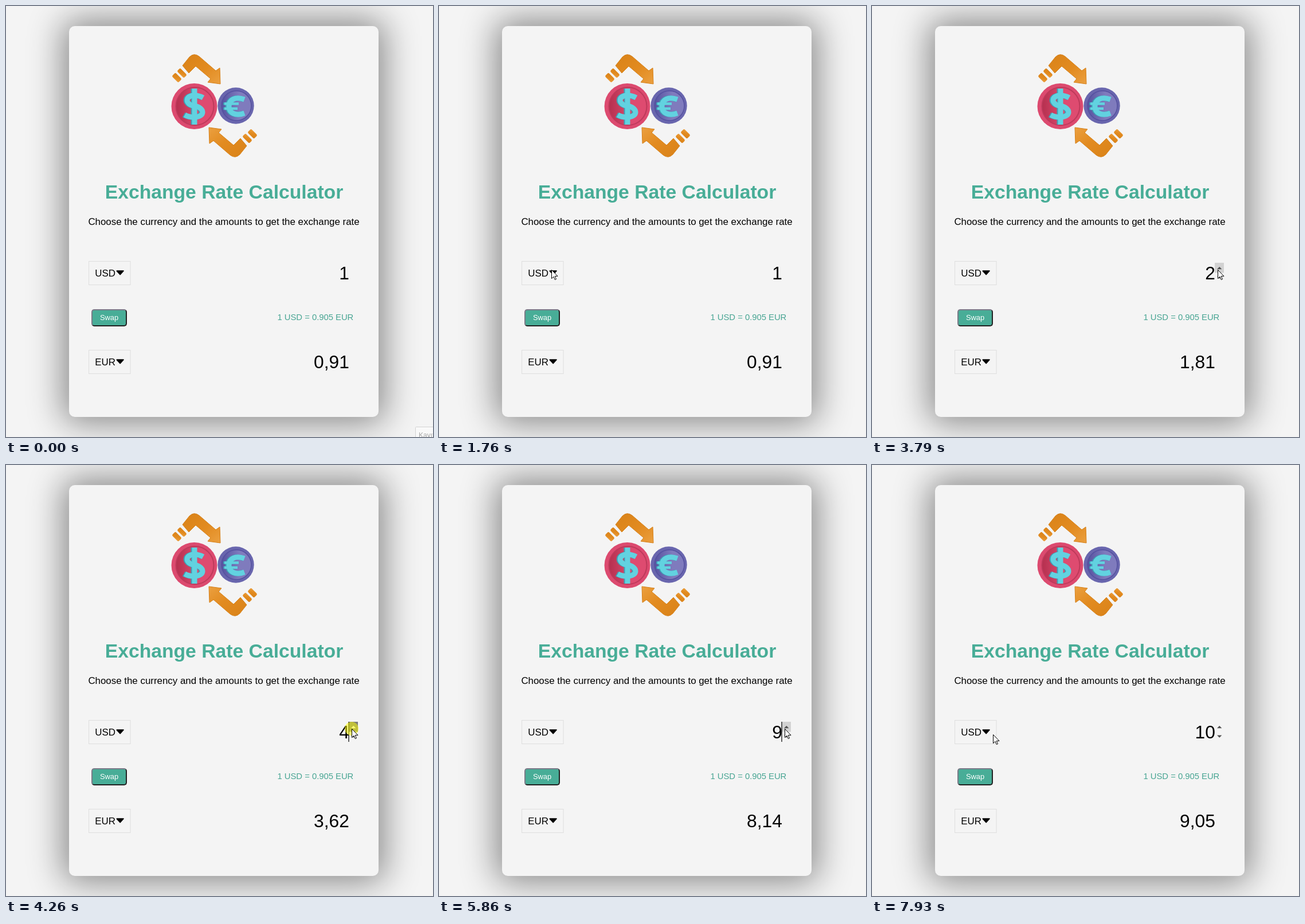
Write an HTML page that moves like this. It is 745 by 752 pixels and loops after 8000 ms.

```html
<!DOCTYPE html>
<html lang="en">
<head>
<meta charset="utf-8">
<title>Exchange Rate Calculator</title>
<style>
  html, body { margin: 0; width: 100%; height: 100%; overflow: hidden; background: #f4f4f4; }
  #stage { position: relative; width: 745px; height: 752px; overflow: hidden; }
  #card {
    position: absolute; left: 110px; top: 35px; width: 540px; height: 682px;
    border-radius: 10px; background: #f4f4f4; box-shadow: 0 0 60px 10px rgba(0, 0, 0, .45);
  }
  #swap {
    position: absolute; left: 149px; top: 528.5px; width: 62px; height: 30px; box-sizing: border-box;
    border: 2px solid; border-color: #7a7a88 #222 #222 #7a7a88;
    border-radius: 5px; background: #48ad97;
  }
  svg { position: absolute; left: 0; top: 0; font-family: "Liberation Sans", Arial, sans-serif; }
  .title { font-size: 33.7px; font-weight: bold; fill: #48ad97; }
  .label { font-size: 16.9px; }
  .amount { font-size: 31.7px; text-anchor: end; }
  .rate { font-size: 14.8px; fill: #48a593; text-anchor: end; }
  .mid { text-anchor: middle; }
  .sign { fill: none; stroke-width: 9; }
</style>
</head>
<body>
<div id="stage">
  <div id="card"></div>
  <div id="swap"></div>
  <svg width="745" height="752" viewBox="0 0 745 752">
    <defs>
      <linearGradient id="orange" x1="0" y1="0" x2="1" y2="1">
        <stop offset="0" stop-color="#d98218"/>
        <stop offset=".55" stop-color="#e28b20"/>
        <stop offset="1" stop-color="#eba040"/>
      </linearGradient>
      <linearGradient id="pink" x1="0" y1="0" x2="1" y2="0">
        <stop offset="0" stop-color="#b5304f"/>
        <stop offset=".6" stop-color="#de4b70"/>
      </linearGradient>
      <linearGradient id="violet" x1="0" y1="0" x2="1" y2="0">
        <stop offset="0" stop-color="#5652a0"/>
        <stop offset=".6" stop-color="#7f7bbd"/>
      </linearGradient>
      <g id="arrow" fill="url(#orange)">
        <path d="M308 104L320 89Q328 81 337 88L366 113L373 108L374 136L352 133L357 127L331 105L319 117Z" stroke="#d68019" stroke-linejoin="round"/>
        <rect x="298.5" y="113" width="17" height="8" rx="2.5" transform="rotate(45 307 117)"/>
        <rect x="290" y="120.5" width="16" height="9" rx="2.5" transform="rotate(45 298 125)"/>
      </g>
      <g id="dollar" class="sign">
        <path d="M344 160Q337 156 329 156C312 156 312 172 328 174C348 177 348 194 328 194Q319 194 312 190"/>
        <path d="M329 144V207"/>
      </g>
      <g id="euro" class="sign">
        <path d="M416 163C400 157 389 164 389 175S400 193 416 187"/>
        <path d="M381 170.5H406M381 179H404" stroke-width="4.5"/>
      </g>
      <g id="select">
        <rect x="144.5" y="445.5" width="72.5" height="41" fill="none" stroke="#dedede"/>
        <path d="M193.5 462.2H204.8L199.2 468.4Z" stroke="#000" stroke-width="2" stroke-linejoin="round"/>
      </g>
    </defs>

    <use href="#arrow"/>
    <use href="#arrow" transform="rotate(180 364 174)"/>
    <circle cx="328.5" cy="175" r="40" fill="#dc4a6f"/>
    <circle cx="329.5" cy="175" r="33" fill="url(#pink)" stroke="#bd3a5b" stroke-width="2"/>
    <circle cx="401" cy="174" r="31.7" fill="#6966ae"/>
    <circle cx="402" cy="174" r="26" fill="url(#violet)" stroke="#5551a0" stroke-width="1.5"/>
    <g stroke="#3f9fb4" transform="translate(-2 0)"><use href="#dollar"/><use href="#euro"/></g>
    <g stroke="#62d2e0"><use href="#dollar"/><use href="#euro"/></g>

    <text class="title mid" x="380.5" y="336">Exchange Rate Calculator</text>
    <text class="label mid" x="380" y="381.5">Choose the currency and the amounts to get the exchange rate</text>

    <use href="#select"/>
    <use href="#select" y="155"/>
    <text class="label" x="155.2" y="471.5">USD</text>
    <text class="label" x="155.2" y="626.5">EUR</text>
    <text class="mid" x="180" y="548" font-size="12.9" fill="#fff">Swap</text>
    <text class="rate" x="606.3" y="548">1 USD = 0.905 EUR</text>
    <text class="amount" id="usd" x="598.8" y="476.5"></text>
    <text class="amount" id="eur" x="598.8" y="631.5"></text>

    <g id="spin">
      <rect id="spinUp" x="598" y="448" width="16" height="17.5"/>
      <path id="tri" d="M602 459.3L606.2 455L610.4 459.3Z"/>
      <path d="M602 471.5L606.2 475.8L610.4 471.5Z" fill="#505050"/>
    </g>
    <rect id="caret" x="597.4" y="448" width="1.2" height="35"/>
    <circle id="press" cx="603" cy="460" r="12" fill="#ff0" opacity=".52"/>

    <g id="tip">
      <rect x="714.5" y="734.5" width="60" height="40" rx="1" fill="#f9f9f9" stroke="#d2d2d2"/>
      <text x="720" y="753" font-size="12" fill="#a8a8a8">Kayıt</text>
    </g>
    <path id="cursor" d="M.5 .5V15.5L4 12.3L6.3 17.6L8.5 16.6L6.2 11.4H11Z" fill="#fff" stroke="#000"/>
  </svg>
</div>
<script>
  const LOOP = 8000, FRAME = 1000 / 15, BLINK = 530, HOLD = 60, RATE = 0.905;
  const $ = id => document.getElementById(id);

  const enter = { at: 720, x: 617, y: 738 };
  const moves = [
    { from: 720, to: 1460, x: 196, y: 460 },   // to the currency list
    { from: 1800, to: 2270, x: 632, y: 463 },  // past the amount
    { from: 2270, to: 2380, x: 601, y: 462 },  // back to its up button
    { from: 2450, to: 2800, x: 603, y: 460 },
    { from: 6600, to: 6930, x: 686, y: 531 },  // away
    { from: 7580, to: 7930, x: 211, y: 470 }   // back to the list
  ];
  const presses = [3260, 3860, 4260, 4660, 5060, 5330, 5560, 5800, 6270];

  // Smooth glide across, with the height settling early; sampled at the screen rate.
  function pointer(time) {
    const t = Math.floor((time + 8) / FRAME) * FRAME;
    let { x, y } = enter;
    for (const m of moves) {
      const k = Math.min(1, Math.max(0, (t - m.from) / (m.to - m.from)));
      x += (m.x - x) * k * k * (3 - 2 * k);
      y += (m.y - y) * k * (2 - k);
    }
    return [Math.round(x), Math.round(y)];
  }

  const show = (id, on) => $(id).setAttribute("visibility", on ? "visible" : "hidden");

  function draw(t) {
    const done = presses.filter(p => p <= t);
    const since = t - done[done.length - 1];
    const down = since < HOLD;
    const amount = 1 + done.length;
    $("usd").textContent = amount;
    $("eur").textContent = (amount * RATE).toFixed(2).replace(".", ",");

    const [x, y] = pointer(t);
    const seen = t >= enter.at;
    $("cursor").setAttribute("transform", `translate(${x} ${y})`);
    show("cursor", seen);

    const overInput = seen && x >= 208 && x <= 615 && y >= 446 && y <= 486;
    const overUp = overInput && x >= 598 && y <= 465;
    $("spin").style.display = overInput ? "" : "none";
    $("spinUp").setAttribute("fill", down ? "#7c7c7c" : overUp ? "#d2d2d2" : "none");
    $("tri").setAttribute("fill", down ? "#fff" : "#505050");
    show("press", down);
    show("caret", since % (2 * BLINK) < BLINK);

    $("tip").setAttribute("opacity", t < 70 ? 1 : t < 120 ? 0.4 : 0);
  }

  const start = performance.now();
  function tick() {
    draw((performance.now() - start) % LOOP);
    requestAnimationFrame(tick);
  }
  draw(0);
  requestAnimationFrame(tick);
</script>
</body>
</html>
```
